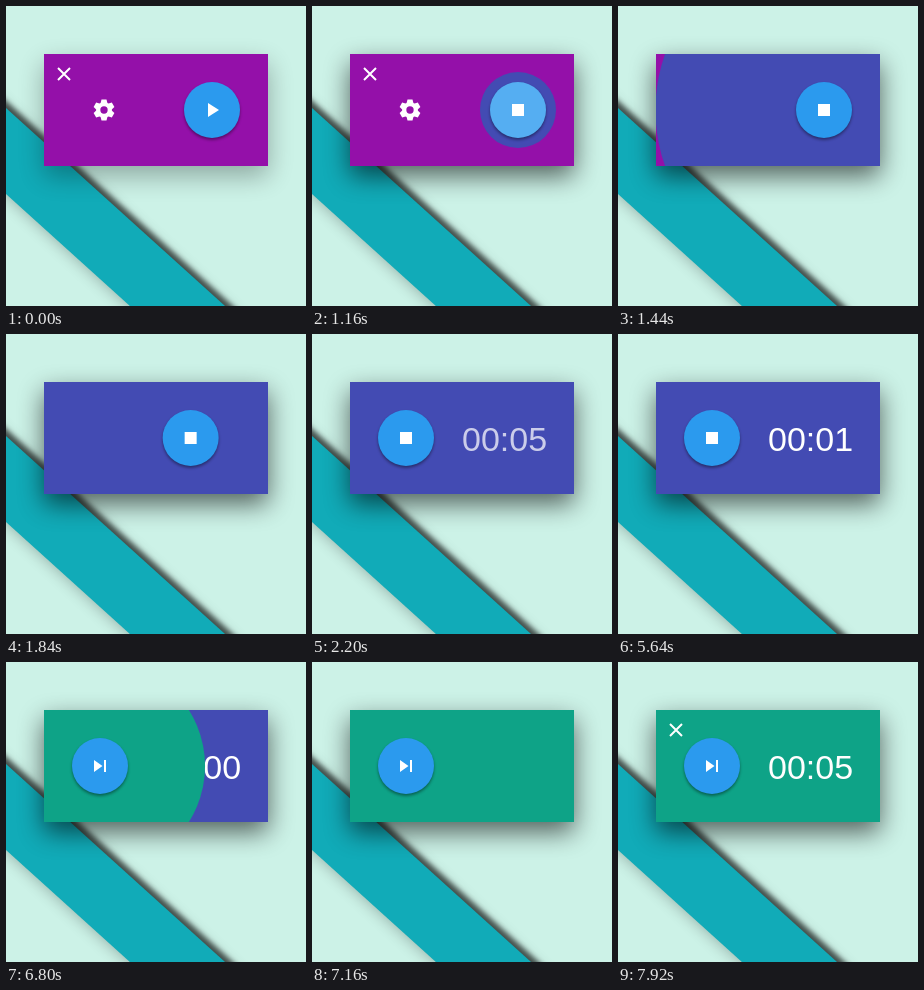
Recreate the animation shown at these times as an HTML page. Size 300 by 300 pixels, loop 8 s.

```html
<!DOCTYPE html>
<html lang="en">
<head>
<meta charset="utf-8">
<title>Timer card</title>
<style>
  html, body { margin: 0; width: 100%; height: 100%; overflow: hidden; background: #ccf2e7; }
  svg { display: block; width: 100%; height: 100%; }
  text { font: 34px "Liberation Sans", Arial, sans-serif; fill: #fff; }
</style>
</head>
<body>
<svg viewBox="0 0 300 300">
  <defs>
    <filter id="soft" x="-50%" y="-50%" width="200%" height="200%"><feGaussianBlur stdDeviation="13"/></filter>
    <filter id="medium" filterUnits="userSpaceOnUse" x="-60" y="-60" width="420" height="420"><feGaussianBlur stdDeviation="8"/></filter>
    <filter id="tight" filterUnits="userSpaceOnUse" x="-60" y="-60" width="420" height="420"><feGaussianBlur stdDeviation="2.5"/></filter>
    <filter id="fine" x="-20%" y="-20%" width="140%" height="140%"><feGaussianBlur stdDeviation="1.4"/></filter>
    <clipPath id="cardClip"><rect x="38" y="48" width="224" height="112"/></clipPath>
    <path id="band" d="M-100 11.6L300 373.2V459.2L-100 97.6Z"/>
    <path id="cross" d="M52 62L64 74M64 62L52 74" stroke="#fff" stroke-width="2"/>
  </defs>

  <rect width="300" height="300" fill="#ccf2e7"/>
  <use href="#band" filter="url(#medium)" opacity=".3"/>
  <use href="#band" filter="url(#tight)" opacity=".6" x="3.5" y="-4"/>
  <use href="#band" fill="#11abb8"/>

  <rect id="cardShadow" x="38" y="58" width="224" height="112" filter="url(#soft)"/>
  <g clip-path="url(#cardClip)">
    <rect x="38" y="48" width="224" height="112" fill="#9410a9"/>
    <use href="#cross"/>
    <g id="gear" transform="translate(98 104) scale(1.05)" fill="#fff">
      <circle r="5.5" fill="none" stroke="#fff" stroke-width="4"/>
    </g>
    <circle id="startRipple" cx="206" cy="104" fill="#434bb3"/>
    <text id="countdown" x="150" y="117"></text>
    <circle id="doneRipple" cx="94" cy="104" fill="#0ea387"/>
    <g id="next">
      <use href="#cross"/>
      <text x="150" y="117">00:05</text>
    </g>
  </g>

  <g id="button">
    <circle cy="2" r="28" filter="url(#fine)" opacity=".4"/>
    <circle r="28" fill="#2b9aee"/>
    <circle id="flash" r="28" fill="#fff"/>
    <path id="icon" fill="#fff"/>
  </g>
</svg>
<script>
const LOOP = 8000;
const RIPPLE = { radius: 180, duration: 530 };
const START = 1075, DONE = 6622;
const TICKS = [2640, 3640, 4600, 5640, 6640];
const ICONS = {
  play: 'M-4 -7V7L7 0Z',
  stop: 'M-6 -6H6V6H-6Z',
  skip: 'M-6 -6V6L2.5 0ZM4 -6H6V6H4Z'
};

const $ = id => document.getElementById(id);
const set = (id, name, value) => $(id).setAttribute(name, value);
const progress = (t, start, duration) => Math.min(1, Math.max(0, (t - start) / duration));

// cubic-bezier(.25, .1, .25, 1)
function ease(x) {
  if (x <= 0 || x >= 1) return x;
  const bezier = (s, a, b) => 3 * a * s * (1 - s) ** 2 + 3 * b * s * s * (1 - s) + s ** 3;
  let low = 0, high = 1;
  for (let i = 0; i < 20; i++) {
    const mid = (low + high) / 2;
    if (bezier(mid, .25, .25) < x) low = mid; else high = mid;
  }
  return bezier(low, .1, 1);
}
const eased = (t, start, duration) => ease(progress(t, start, duration));

for (let angle = 0; angle < 360; angle += 60) {
  $('gear').insertAdjacentHTML('beforeend',
    `<path d="M-3.4 -6L-2.4 -10H2.4L3.4 -6Z" transform="rotate(${angle})"/>`);
}

function render(t) {
  const rippleRadius = start => RIPPLE.radius * eased(t, start, RIPPLE.duration);
  const left = 5 - TICKS.filter(tick => t >= tick).length;

  set('cardShadow', 'opacity', .3 + .3 * eased(t, 940, 220));
  set('startRipple', 'r', rippleRadius(START));
  set('doneRipple', 'r', rippleRadius(DONE));

  $('countdown').textContent = `00:0${left}`;
  set('countdown', 'opacity', eased(t, 2080, 280));
  set('next', 'opacity', eased(t, 7660, 280));

  set('button', 'transform', `translate(${206 - 112 * eased(t, 1780, 400)} 104)`);
  set('flash', 'opacity', .2 * (progress(t, 960, 140) - progress(t, 1180, 220)));
  set('icon', 'd', t < START ? ICONS.play : t < DONE ? ICONS.stop : ICONS.skip);
}

const origin = performance.now();
function frame() {
  render((performance.now() - origin) % LOOP);
  requestAnimationFrame(frame);
}
frame();
</script>
</body>
</html>
```
